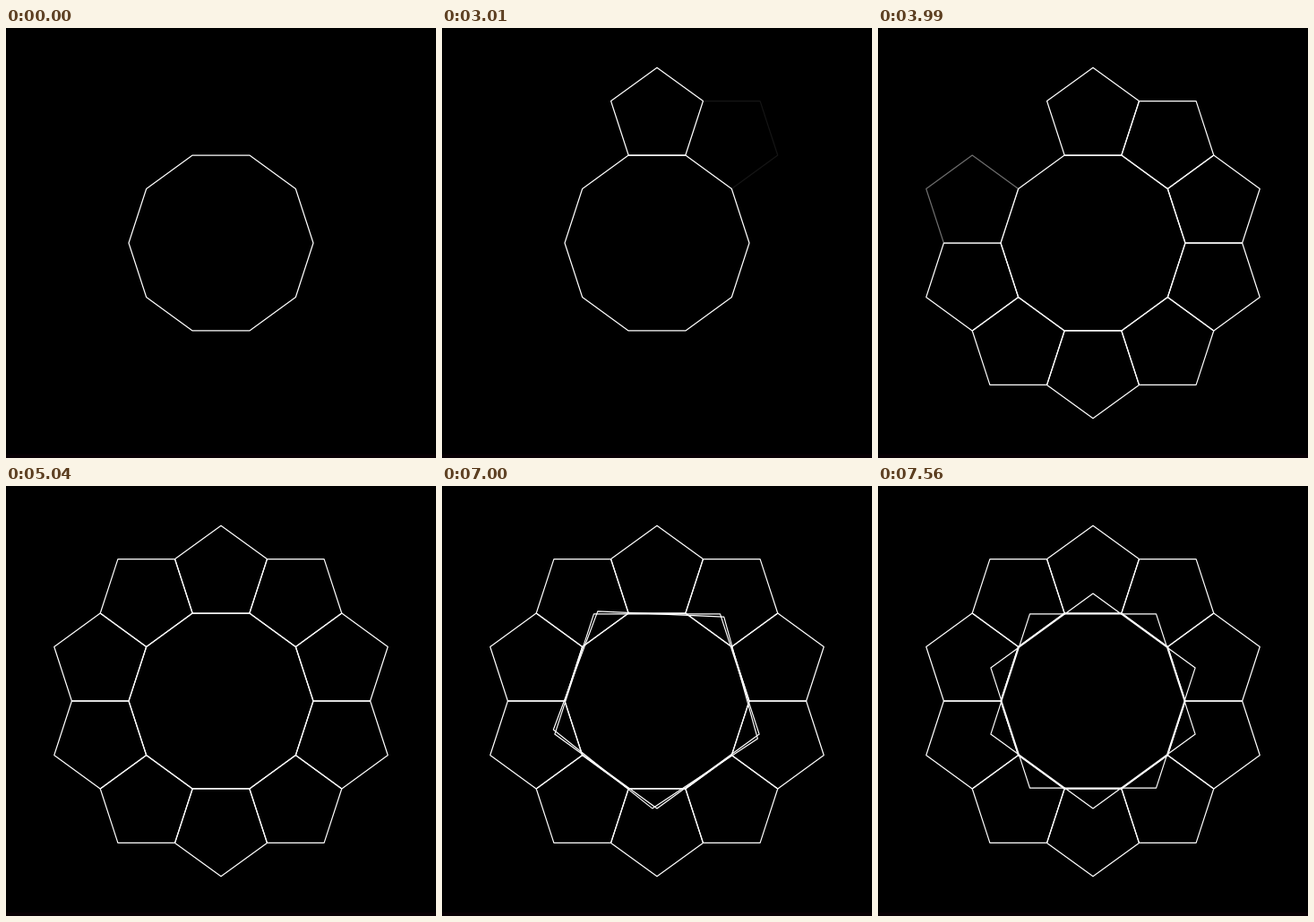
Write an HTML page with a canvas that moves like this. It is 480 px wide and 480 px high and loops after 8000 ms.

```html
<!DOCTYPE html>
<html lang="en">
<head>
<meta charset="utf-8">
<title>Decagon and pentagons</title>
<style>
  html, body { margin: 0; width: 100%; height: 100%; overflow: hidden; background: #000; }
  canvas { display: block; width: 480px; height: 480px; }
</style>
</head>
<body>
<canvas id="stage" width="480" height="480"></canvas>
<script>
const ctx = document.getElementById('stage').getContext('2d');
const LOOP = 8000, TICK = 70, CENTER = 240;
const DECAGON_R = 103, PETAL_R = 54.1, STAR_R = 120;
const rad = deg => deg * Math.PI / 180;

// Petals sit flush on the decagon's sides.
const PETAL_DIST = DECAGON_R * Math.cos(rad(18)) + PETAL_R * Math.cos(rad(36));

const FADE = 600, RING_STEP = 400 / 3;
const FIRST_PETAL = 1200, RING = 2999, INNER = 5120, TURN = 6958;

const progress = (t, start, span) => Math.min(1, Math.max(0, (t - start) / span));

// Angles run clockwise from the positive x axis.
function polygon(sides, radius, angle, alpha, x = CENTER, y = CENTER) {
  if (alpha <= 0) return;
  ctx.globalAlpha = alpha;
  ctx.beginPath();
  for (let i = 0; i < sides; i++) {
    const a = rad(angle + i * 360 / sides);
    ctx.lineTo(x + radius * Math.cos(a), y + radius * Math.sin(a));
  }
  ctx.closePath();
  ctx.stroke();
}

function petal(index, alpha) {
  const angle = -90 + index * 36, a = rad(angle);
  polygon(5, PETAL_R, angle, alpha,
    CENTER + PETAL_DIST * Math.cos(a), CENTER + PETAL_DIST * Math.sin(a));
}

function draw(t) {
  ctx.globalAlpha = 1;
  ctx.fillStyle = '#000';
  ctx.fillRect(0, 0, 480, 480);
  ctx.fillStyle = '#080004';
  ctx.fillRect(0, 476, 480, 4);
  ctx.strokeStyle = '#fff';
  ctx.lineWidth = 1.2;
  ctx.lineJoin = 'round';

  polygon(10, DECAGON_R, 0, 1);
  petal(0, progress(t, FIRST_PETAL, FADE));
  for (let i = 1; i < 10; i++) {
    petal(i, progress(t, RING + (i - 1) * RING_STEP, RING_STEP));
  }
  polygon(5, STAR_R, 90, progress(t, INNER, FADE));
  if (t > TURN) polygon(5, STAR_R, 90 + 36 * progress(t, TURN, FADE), 1);
}

const start = performance.now();
function frame() {
  const t = (performance.now() - start) % LOOP;
  draw(Math.floor(t / TICK) * TICK);
  requestAnimationFrame(frame);
}
frame();
</script>
</body>
</html>
```
